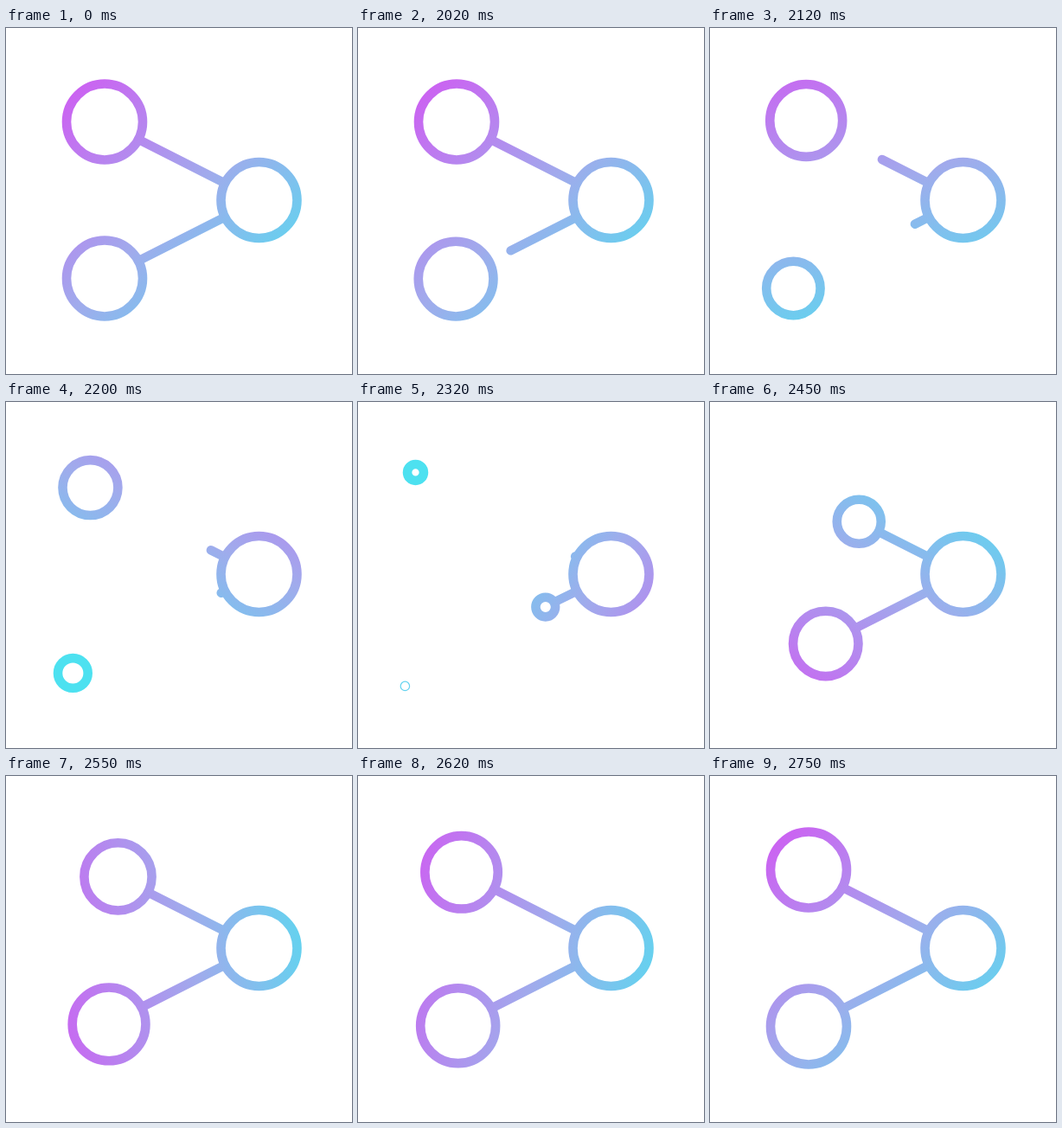
Recreate the animation shown at these times as an HTML page with a canvas. Size 400 by 400 pixels, loop 2.77 s.

```html
<!DOCTYPE html>
<html lang="en">
<head>
<meta charset="utf-8">
<title>Share icon</title>
<style>
  html, body { margin: 0; width: 100%; height: 100%; overflow: hidden; background: #fff; }
  canvas { display: block; width: 400px; height: 400px; }
</style>
</head>
<body>
<canvas id="stage"></canvas>
<script>
const LOOP = 2770, REST = 2020, STEPS = 30;
const RADIUS = 44, STROKE = 10.6, LINE = 10.4, INSET = 0.5;
const HUB = { x: 292.5, y: 199 };

// home: resting place, exit: where the old ring shrinks away,
// root: where the line meets the hub; the rest are start times (0..1)
const NODES = [
  { home: [114, 108.5], exit: [53.5, 74], root: [252.5, 179.2], ringOut: 0.106, lineOut: 0.1, enter: 0.512 },
  { home: [114, 289.5], exit: [53.5, 329], root: [252.5, 218.8], ringOut: 0, lineOut: 0, enter: 0.403 }
];

// progress -> direction of the gradient in degrees
const TURN = [[0, 45], [0.167, 71], [0.433, 211], [0.6, 303], [0.733, 351], [1, 405]];
const PIVOT = { x: 247, y: 201 };
const STOPS = [[-200, "rgb(208,90,242)"], [0, "rgb(160,171,236)"], [178, "rgb(77,225,240)"]];
const SHIFT = -31;

const canvas = document.getElementById("stage");
const ctx = canvas.getContext("2d");
const scale = window.devicePixelRatio || 1;
canvas.width = canvas.height = 400 * scale;
ctx.scale(scale, scale);
ctx.lineCap = "round";

const clamp = v => Math.min(1, Math.max(0, v));
const smooth = v => { v = clamp(v); return v * v * (3 - 2 * v); };
const decay = (rate, span) => (1 - Math.exp(-rate * span));
const mix = (a, b, k) => [a[0] + (b[0] - a[0]) * k, a[1] + (b[1] - a[1]) * k];

// Motion advances in 30 steps, alternately 30 ms and 20 ms long.
function progress(time) {
  const t = time % LOOP - REST;
  if (t < 0) return 0;
  const step = 2 * Math.floor(t / 50) + (t % 50 >= 30 ? 1 : 0);
  return Math.min(1, (step + 1) / STEPS);
}

function turnAt(u) {
  const last = TURN.length - 1;
  const slope = i => i <= 0 || i >= last ? 36
    : (TURN[i + 1][1] - TURN[i - 1][1]) / (TURN[i + 1][0] - TURN[i - 1][0]);
  let i = 0;
  while (i < last - 1 && u > TURN[i + 1][0]) i++;
  const [u0, a0] = TURN[i], [u1, a1] = TURN[i + 1];
  const w = u1 - u0, k = (u - u0) / w, j = 1 - k;
  return a0 * j * j * (1 + 2 * k) + a1 * k * k * (3 - 2 * k)
    + w * (slope(i) * k * j * j - slope(i + 1) * k * k * j);
}

function paint(u) {
  const angle = turnAt(u) * Math.PI / 180;
  const dx = Math.cos(angle), dy = Math.sin(angle);
  const from = STOPS[0][0], to = STOPS[2][0];
  const at = s => [PIVOT.x + dx * (s + SHIFT), PIVOT.y + dy * (s + SHIFT)];
  const fill = ctx.createLinearGradient(...at(from), ...at(to));
  for (const [s, color] of STOPS) fill.addColorStop((s - from) / (to - from), color);
  return fill;
}

function ring(x, y, r) {
  // A nearly closed ring is left as a hairline.
  const closed = r < 1;
  ctx.lineWidth = closed ? 1.2 : STROKE;
  ctx.beginPath();
  ctx.arc(x, y, closed ? 5.2 : r, 0, 2 * Math.PI);
  ctx.stroke();
}

function line(a, b) {
  ctx.lineWidth = LINE;
  ctx.beginPath();
  ctx.moveTo(...a);
  ctx.lineTo(...b);
  ctx.stroke();
}

// The point of a node's ring where its line starts, facing the hub
function rim([x, y], r) {
  const dx = HUB.x - x, dy = HUB.y - y, d = Math.hypot(dx, dy);
  return [x + dx / d * r, y + dy / d * r + Math.sign(dy) * INSET];
}

function drawOld(node, u) {
  const q = smooth((u - node.ringOut) / 0.467);
  if (q < 0.999) ring(...mix(node.home, node.exit, q), RADIUS * (1 - q));
  const left = Math.exp(-15.85 * Math.pow(Math.max(0, u - node.lineOut), 1.2));
  if (u <= node.enter) line(mix(node.root, rim(node.home, RADIUS), left), node.root);
}

function drawNew(node, u) {
  if (u <= node.enter) return;
  const q = u >= 1 ? 1 : decay(9.8, u - node.enter) / decay(9.8, 0.6);
  const place = mix(node.root, node.home, q), r = RADIUS * q;
  ring(...place, r);
  line(rim(place, r), node.root);
}

function draw(now) {
  const u = progress(now);
  ctx.fillStyle = "#fff";
  ctx.fillRect(0, 0, 400, 400);
  ctx.strokeStyle = paint(u);
  for (const node of NODES) {
    drawOld(node, u);
    drawNew(node, u);
  }
  ring(HUB.x, HUB.y, RADIUS);
}

const start = performance.now();
function tick() {
  draw(performance.now() - start);
  requestAnimationFrame(tick);
}
tick();
</script>
</body>
</html>
```
